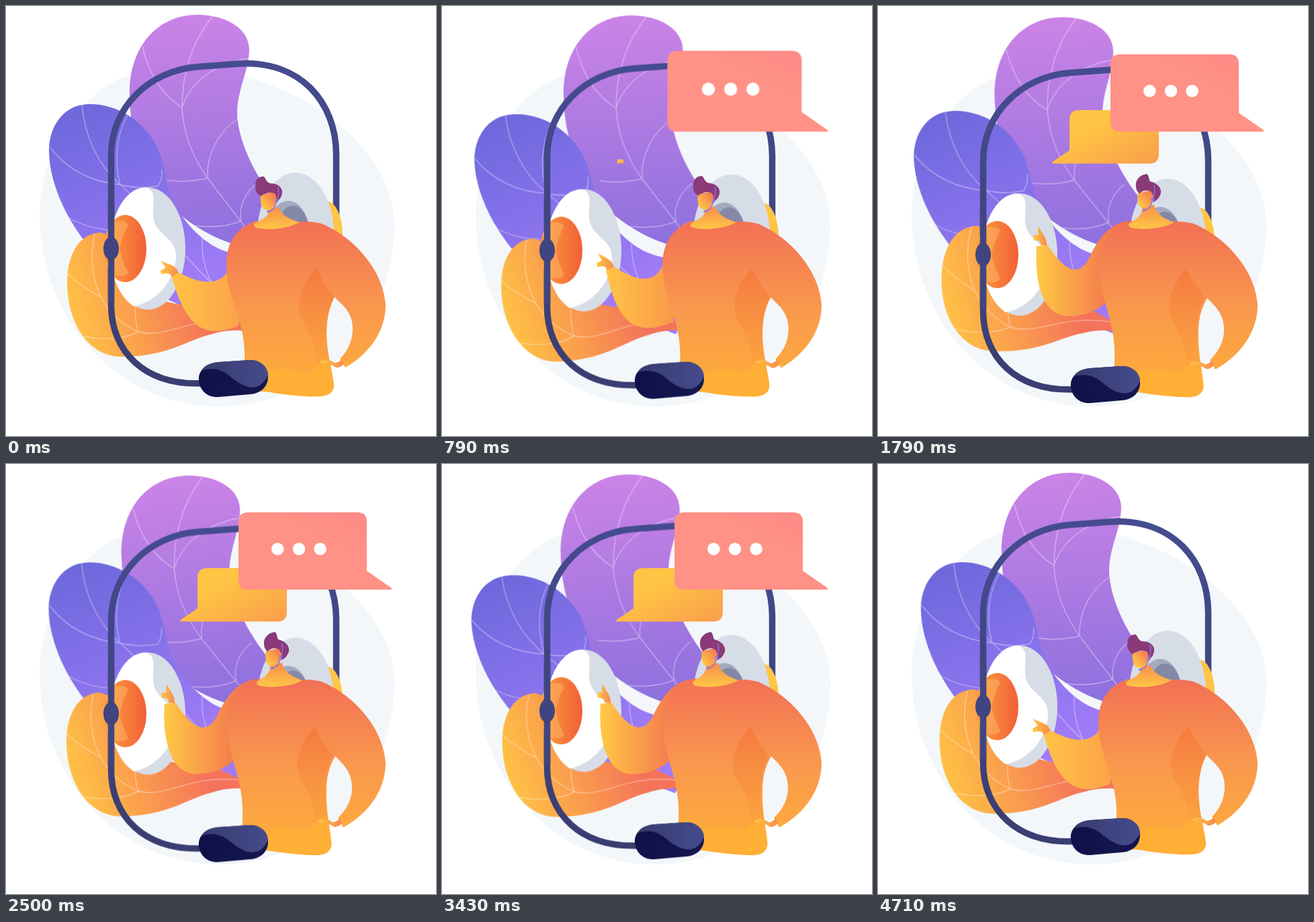
An HTML page that plays this animation: 640 px wide and 640 px high, repeating every 4.78 s.

```html
<!DOCTYPE html>
<html lang="en">
<head>
<meta charset="utf-8">
<title>Support agent</title>
<style>
  html, body { margin: 0; width: 100%; height: 100%; overflow: hidden; background: #fff; }
  svg { display: block; width: 100%; height: 100%; }

  :root { --sine: cubic-bezier(.364, 0, .636, 1); }
  .sway { animation: sway 1195ms var(--sine) infinite alternate; }
  .tall { --to: -1.43deg; transform-origin: 450px 620px; animation-duration: 2390ms; }
  .wide { --to: -3.44deg; transform-origin: 455px 575px; }
  .low { --from: 2.87deg; --to: -2.87deg; transform-origin: 340px 480px; animation-delay: -597.5ms; }
  @keyframes sway {
    from { transform: rotate(var(--from, 0deg)); }
    to { transform: rotate(var(--to)); }
  }

  .bob { animation: bob 2390ms var(--sine) infinite alternate; }
  @keyframes bob { to { transform: translateY(10.5px); } }

  .morph, .shift, .tint { animation: 4780ms var(--sine) infinite; }
  .morph { animation-name: morph; }
  .shift { animation-name: shift; }
  .tint { animation-name: tint; }
  @keyframes morph {
    0%, 6.3%, 98.5%, 100% { d: var(--a); }
    39.7%, 78.9% { d: var(--b); }
  }
  @keyframes shift {
    0%, 6.3%, 98.5%, 100% { transform: none; }
    39.7%, 78.9% { transform: translate(var(--by)); }
  }
  @keyframes tint {
    0%, 6.3%, 98.5%, 100% { stop-color: #fba24b; }
    39.7%, 78.9% { stop-color: #f3764f; }
  }

  .say { transform-origin: 574px 187px; animation: say 4780ms ease-in-out infinite; }
  .reply { transform-origin: 259px 234px; animation: reply 4780ms ease-in-out infinite; }
  @keyframes say {
    0%, 1.5% { transform: rotate(30deg) scale(0); animation-timing-function: ease-out; }
    6% { transform: rotate(19deg) scale(.96); animation-timing-function: linear; }
    9% { transform: rotate(7.8deg) scale(1.08); animation-timing-function: ease-out; }
    13.5% { transform: rotate(0deg) scale(1.06); }
    25.3% { transform: rotate(0deg) scale(.96); }
    35%, 85.8% { transform: rotate(0deg) scale(1); animation-timing-function: ease-in; }
    95.2%, 100% { transform: rotate(0deg) scale(0); }
  }
  @keyframes reply {
    0%, 15.7% { transform: scale(0); animation-timing-function: linear; }
    25.3% { transform: scale(.805); animation-timing-function: ease-out; }
    30.5% { transform: scale(1.04); }
    35.5%, 85% { transform: scale(1); animation-timing-function: ease-in; }
    94.5%, 100% { transform: scale(0); }
  }

  .veins { fill: none; stroke: #fff; stroke-opacity: .38; stroke-width: 1.4; stroke-linecap: round; }
</style>
</head>
<body>
<svg viewBox="0 0 640 640">
  <defs>
    <linearGradient id="tall" gradientUnits="userSpaceOnUse" x1="270" y1="15" x2="290" y2="360">
      <stop stop-color="#cb83e6"/><stop offset="1" stop-color="#8c70de"/>
    </linearGradient>
    <linearGradient id="wide" gradientUnits="userSpaceOnUse" x1="120" y1="146" x2="230" y2="430">
      <stop stop-color="#6d68dc"/><stop offset="1" stop-color="#a07bf8"/>
    </linearGradient>
    <linearGradient id="low" gradientUnits="userSpaceOnUse" x1="100" y1="490" x2="290" y2="430">
      <stop stop-color="#ffc444"/><stop offset=".5" stop-color="#fa9c4e"/><stop offset="1" stop-color="#f4735a"/>
    </linearGradient>
    <linearGradient id="band" gradientUnits="userSpaceOnUse" x1="0" y1="85" x2="0" y2="565">
      <stop stop-color="#454c8f"/><stop offset="1" stop-color="#3a3d70"/>
    </linearGradient>
    <linearGradient id="yolk">
      <stop offset=".1" stop-color="#fb9a3c"/><stop offset="1" stop-color="#f25f38"/>
    </linearGradient>
    <linearGradient id="mic">
      <stop stop-color="#10114a"/><stop offset="1" stop-color="#15174f"/>
    </linearGradient>
    <linearGradient id="shine">
      <stop stop-color="#383b6e"/><stop offset="1" stop-color="#454b8d"/>
    </linearGradient>
    <linearGradient id="shirt" gradientUnits="userSpaceOnUse" x1="0" y1="325" x2="0" y2="580">
      <stop stop-color="#f37255"/><stop offset=".5" stop-color="#f9994d"/><stop offset="1" stop-color="#ffaf38"/>
    </linearGradient>
    <linearGradient id="fold" x1="0" y1="0" x2="0" y2="1">
      <stop stop-color="#f4702f" stop-opacity=".55"/><stop offset="1" stop-color="#f98a30" stop-opacity=".1"/>
    </linearGradient>
    <linearGradient id="arm" gradientUnits="userSpaceOnUse" x1="240" y1="0" x2="348" y2="0">
      <stop stop-color="#ffc545"/><stop offset="1" class="tint" stop-color="#fba24b"/>
    </linearGradient>
    <linearGradient id="skin">
      <stop offset=".1" stop-color="#ffc143"/><stop offset="1" stop-color="#f78a4e"/>
    </linearGradient>
    <linearGradient id="face" x1="0" y1="1" x2="1" y2="0">
      <stop offset=".2" stop-color="#ffc143"/><stop offset="1" stop-color="#f06a58"/>
    </linearGradient>
    <linearGradient id="neck" x1="0" y1="0" x2="0" y2="1">
      <stop stop-color="#f78d4d"/><stop offset="1" stop-color="#ffc746"/>
    </linearGradient>
    <linearGradient id="say" x1="0" y1="1" x2="1" y2="0">
      <stop offset=".6" stop-color="#ff9186"/><stop offset="1" stop-color="#fc8886"/>
    </linearGradient>
    <linearGradient id="reply" x1="0" y1="0" x2="1" y2="1">
      <stop offset=".35" stop-color="#ffc444"/><stop offset="1" stop-color="#f99d4c"/>
    </linearGradient>
  </defs>

  <path fill="#f3f7fa" d="M185 103C120 120 50 210 50 310C50 470 170 597 318 596C460 596 578 480 578 325C578 240 500 170 440 138C400 118 365 107 345 102C290 92 230 92 185 103Z"/>

  <g class="sway tall">
    <path fill="url(#tall)" d="M285 13C226 13 183 60 184 132C184 215 225 285 262 313C290 335 320 350 345 356L400 360L410 300C390 280 346 216 344 160C344 125 362 95 362 65C362 32 325 13 285 13Z"/>
    <path class="veins" d="M308 15C275 55 262 105 262 151C264 195 280 228 300 256L355 328M203 60C212 100 232 132 262 151C275 110 315 85 361 78M237 259C258 262 280 261 300 256C298 220 318 185 345 168M281 327C305 330 330 328 350 320C346 298 356 278 374 264"/>
  </g>
  <g class="sway wide">
    <path fill="url(#wide)" d="M125 146C85 146 64 180 64 215C64 270 100 345 160 395C210 430 290 455 352 484L400 400L370 372C320 372 290 350 262 313C235 275 240 240 225 210C205 170 165 146 125 146Z"/>
    <path class="veins" d="M113 147C117 195 138 238 170 266C215 305 255 365 310 416M65 210C92 245 130 262 170 266C160 230 165 190 181 162M170 266C190 271 210 271 226 268Q233 258 232 244M93 315Q125 333 165 334M292 347C291 375 297 395 307 414"/>
  </g>
  <g class="sway low">
    <path fill="url(#low)" d="M140 337C105 340 91 375 91 412C91 472 123 522 172 522C240 522 267 498 304 489C320 484 335 482 350 483V470L320 455C280 446 240 445 215 430C185 412 195 350 140 337Z"/>
    <path class="veins" d="M132 340C124 372 128 405 141 433C154 457 174 475 197 485C240 496 270 462 345 470M91 398Q115 420 141 433M116 492C145 498 175 496 197 485Q190 466 194 440"/>
  </g>

  <g class="bob">
    <path fill="none" stroke="url(#band)" stroke-width="9.5" d="M295 561.5C205 566 156.5 513 156.5 445V222C156.5 150 214 96 285 90.5L345 86C440 80 491 145 491.5 220V325"/>
    <ellipse cx="478" cy="341" rx="23" ry="50" fill="#ffc545"/>
    <ellipse cx="431" cy="339" rx="57" ry="91" fill="#d7dde7"/>
    <ellipse cx="420" cy="340" rx="32" ry="50" fill="#a4aabe"/>
    <ellipse cx="427" cy="340" rx="25" ry="43" fill="#8488a6"/>
    <ellipse cx="211" cy="361" rx="56" ry="91" fill="#d7dde7"/>
    <path fill="#fff" d="M208 270C225 275 218 292 219 312C221 343 255 342 253 375C250 410 225 440 190 447C165 430 155 395 155 361C155 310 178 270 208 270Z"/>
    <ellipse cx="177.5" cy="361" rx="31.5" ry="50" fill="url(#yolk)"/>
    <g fill="#fdb768" opacity=".5">
      <path d="M157 322C168 318 180 319 182 326C176 335 172 348 169 361C161 352 153 345 149 338Z"/>
      <path d="M157 400C168 404 180 403 182 396C176 387 172 374 169 361C161 370 153 377 149 384Z"/>
    </g>
    <path fill="none" stroke="#41467f" stroke-width="9.5" d="M156.5 290V440"/>
    <ellipse cx="156.5" cy="361" rx="11.5" ry="17.5" fill="#404480"/>
  </g>

  <path class="morph" fill="url(#arm)" style="--a:path('M372 320C350 327 338 345 334 385C326 412 300 420 258 397L246 402C258 440 272 482 310 484C330 484 340 478 345 476L372 400Z');--b:path('M372 320C342 324 326 350 314 375C300 402 280 398 252 355L236 357C233 400 240 462 285 461.5C308 461 322 455 336 444L372 400Z')"/>
  <path class="morph" fill="url(#skin)" style="--a:path('M231 379C240 385 252 384 257 397L247 403C243 396 240 398 231 399L230 394C234 391 238 391 237 388C235 386 232 383 231 379Z');--b:path('M240 328C242 337 252 343 251 356L242 355C242 348 240 349 232 348L231 341C236 339 240 341 239 338C237 335 238 331 240 328Z')"/>

  <path class="morph" fill="url(#shirt)" style="--a:path('M375 320C345 327 328 350 328 385C328 440 358 465 355 530L352 573L388 574C420 580 450 582 468 581C484 580 489 572 488 562C486 545 477 515 477 485C478 460 483 445 489 433C500 445 516 455 516 480C516 500 507 515 497 525L505 538C545 515 565 480 565 445C562 395 520 345 470 324C455 320 445 321 437 321Z');--b:path('M375 320C350 327 330 350 329 385C329 440 355 465 352 530L350 573L388 575C420 580 450 583 466 582C480 581 485 573 484 563C483 545 476 515 477 487C477 462 483 447 490 435C500 445 515 457 515 482C515 502 504 517 494 527L502 541C545 517 565 480 565 445C562 395 520 345 470 324C455 320 445 321 439 321Z')"/>
  <g class="shift" style="--by:-2.5px,1px">
    <path fill="url(#fold)" d="M462 390C440 415 428 445 442 470C458 495 463 520 461 540L483 542C479 515 476 495 478 470C479 455 483 442 489 433C478 420 468 405 462 390Z"/>
    <path fill="#ffb134" opacity=".7" d="M385 548C405 536 430 541 445 545C455 547 462 540 461 533L481 533C484 548 489 560 486 570C482 582 450 582 388 574Z"/>
  </g>
  <path class="shift" style="--by:-3px,2px" fill="url(#skin)" d="M466 530C472 524 482 526 487 530C491 533 494 530 500 526L503 533C498 537 493 541 488 536C481 532 473 534 466 530Z"/>

  <path class="morph" fill="url(#neck)" style="--a:path('M391 302C392 312 384 317 372 322C368 325 368 329 373 330C395 335 422 330 437 322C424 317 412 314 405 299Z');--b:path('M393 300C394 310 387 316 376 322C372 325 372 328 377 330C397 334 425 331 441 322C428 317 415 312 411 296Z')"/>
  <path class="morph" fill="url(#face)" style="--a:path('M379 281C378 292 380 301 386 303C394 305 400 301 402 291L404 276Z');--b:path('M387 278C385 290 387 298 393 300C400 301 407 297 409 289L410 274Z')"/>
  <path class="morph" fill="#8a3a78" style="--a:path('M371 268C371 256 379 253 384 254C387 258 388 263 394 264C404 264 412 270 411 278C410 286 406 290 402 290C403 283 402 279 397 278C390 277 384 279 379 283C373 280 371 274 371 268Z');--b:path('M384 268C383 258 391 251 400 250C403 251 403 256 405 261C414 263 423 270 421 279C419 286 414 290 410 292C410 284 410 277 404 275C398 273 392 276 389 279C386 276 384 273 384 268Z')"/>
  <g class="shift" style="--by:6px,-2px">
    <path fill="none" stroke="#8c72e2" stroke-width="1.4" d="M405 269C407 278 405 285 403 290C401 300 396 305 390 306"/>
    <circle cx="403" cy="290" r="2.5" fill="#8c72e2"/>
    <ellipse cx="390" cy="306" rx="2.2" ry="1.6" fill="#8c72e2"/>
  </g>

  <g class="bob">
    <path fill="url(#mic)" d="M316 530L362 527C378 526 390 537 390 552C390 566 380 577 362 578L316 582C300 583 288 572 287 557C286 542 298 532 316 530Z"/>
    <path fill="url(#shine)" d="M291 543C300 539 318 538 332 550C350 566 376 580 390 549C390 537 378 526 362 527L316 530C303 531 294 536 291 543Z"/>
  </g>

  <path class="reply" fill="url(#reply)" d="M299 155H404Q418 155 418 169V220Q418 234.5 404 234.5H261Q257 234 261 231L285 215V169Q285 155 299 155Z"/>
  <g class="say">
    <path fill="url(#say)" d="M360 72H523Q537 72 537 86V159L573 184Q576 187 572 187H360Q346 187 346 173V86Q346 72 360 72Z"/>
    <g fill="#fff">
      <circle cx="404.3" cy="126.5" r="9.3"/>
      <circle cx="436" cy="126.5" r="9.3"/>
      <circle cx="467.6" cy="126.5" r="9.3"/>
    </g>
  </g>
</svg>
</body>
</html>
```
